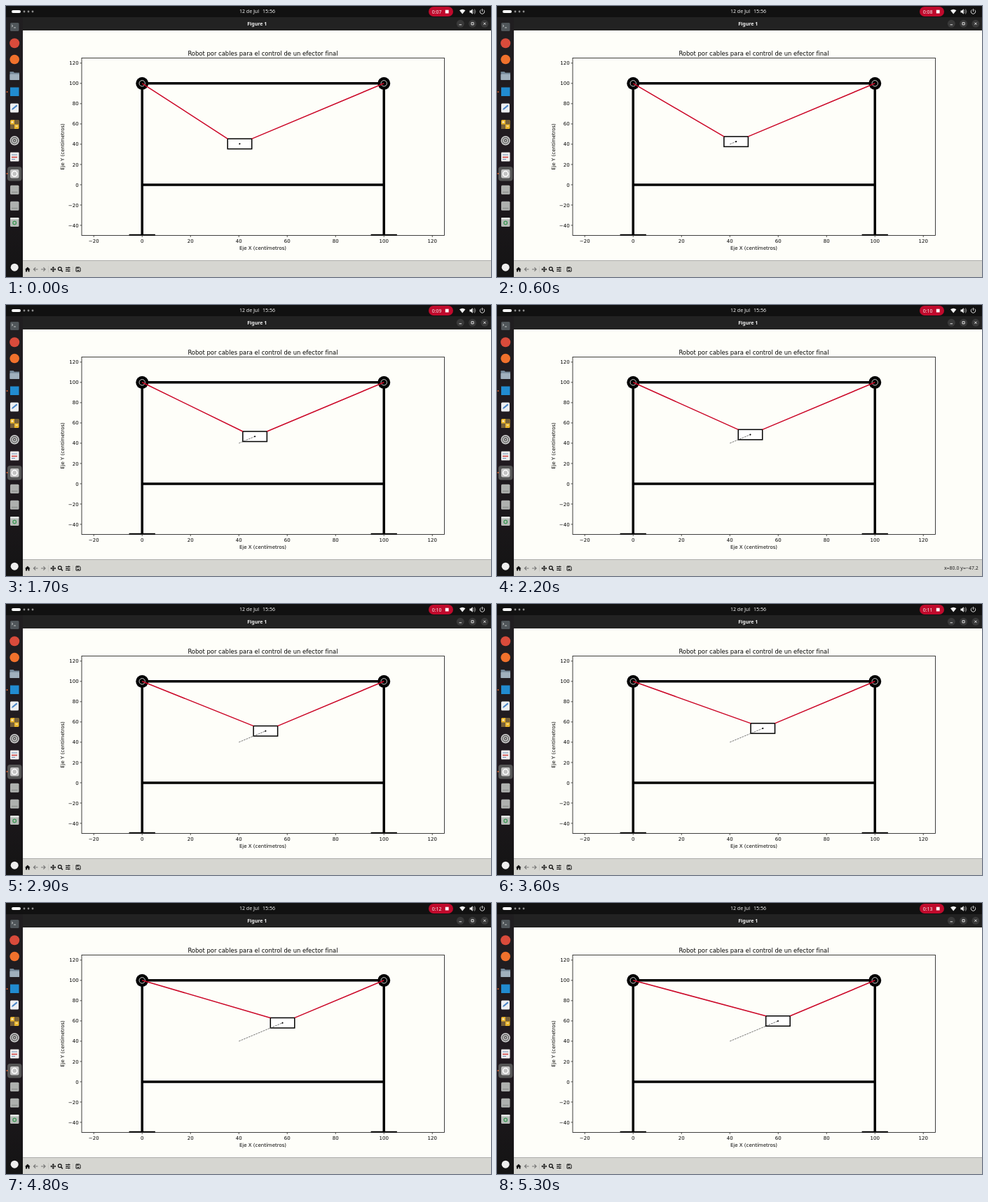
Recreate the animation shown at these times as an HTML page. Size 692 px wide and 388 px high, loop 6000 ms.

```html
<!DOCTYPE html>
<html lang="es">
<head>
<meta charset="utf-8">
<title>Figure 1</title>
<style>
html, body { margin: 0; width: 100%; height: 100%; overflow: hidden; background: #111; }
svg { display: block; width: 692px; height: 388px; }
.ui { font: 7px "Noto Sans", "Open Sans", sans-serif; fill: #f2f2f2; }
.plot { font: 7px "DejaVu Sans", sans-serif; fill: #000; }
.mid { text-anchor: middle; }
.end { text-anchor: end; }
</style>
</head>
<body>
<svg viewBox="0 0 692 388">
  <defs>
    <clipPath id="axes"><rect x="108" y="74.5" width="517.5" height="254"/></clipPath>
    <linearGradient id="dockFill" x2="0" y2="1">
      <stop offset="0" stop-color="#201e20"/><stop offset=".55" stop-color="#211a20"/><stop offset="1" stop-color="#141414"/>
    </linearGradient>
  </defs>

  <!-- top bar -->
  <rect width="692" height="16" fill="#111"/>
  <rect x="8" y="6" width="13" height="4" rx="2" fill="#fff"/>
  <g fill="#8d8d8d"><circle cx="26" cy="8" r="1.4"/><circle cx="32" cy="8" r="1.4"/><circle cx="38" cy="8" r="1.4"/></g>
  <text class="ui" x="333" y="10.4">12 de Jul</text>
  <text class="ui" x="366" y="10.4">15:56</text>
  <rect x="603" y="1" width="35" height="14" rx="7" fill="#c00a2c"/>
  <text class="ui" id="timer" x="607.7" y="10.5"></text>
  <rect x="626.8" y="5.7" width="4.8" height="4.8" fill="#fff"/>
  <g fill="#f2f2f2">
    <path d="M647 6.3Q651.200 3 655.400 6.300L651.200 11.500Z"/>
    <path d="M661.500 6.600h1.800l2.500-2.300v7.400l-2.500-2.300h-1.800Z"/>
    <path d="M667 5.500q2 2.500 0 5M668.500 4.500q2.800 3.500 0 7" fill="none" stroke="#aaa" stroke-width=".8"/>
    <path d="M677.700 5.400a3.200 3.200 0 1 0 3.600 0M679.500 4v4" fill="none" stroke="#f2f2f2" stroke-width=".9"/>
  </g>

  <!-- window -->
  <rect x="24" y="16" width="668" height="19" fill="#222"/>
  <text class="ui mid" x="358.300" y="27.700" font-weight="700" style="font-weight:700">Figure 1</text>
  <g fill="#393939"><circle cx="648.300" cy="25.300" r="5.500"/><circle cx="665.600" cy="25.300" r="5.500"/><circle cx="682.900" cy="25.300" r="5.500"/></g>
  <path d="M646.500 26.800h3.600M664 23.700h3.200v3.200h-3.200ZM681.300 23.700l3.200 3.200m0-3.200l-3.200 3.200" fill="none" stroke="#eee" stroke-width=".9"/>
  <rect x="24" y="35" width="668" height="329.500" fill="#fefef9"/>

  <!-- dock -->
  <rect y="16" width="24" height="372" fill="url(#dockFill)"/>
  <rect x="2" y="230" width="20.500" height="20.500" rx="4" fill="#555"/>
  <g fill="#e2622c"><circle cx="1.600" cy="123" r="1"/><circle cx="1.600" cy="240" r="1"/></g>
  <rect x="6" y="24" width="12.500" height="12" rx="1.500" fill="#50565a"/>
  <path d="M8 27l2 1.500-2 1.500M11 31h3" fill="none" stroke="#ddd" stroke-width=".8"/>
  <circle cx="12.200" cy="53.300" r="7" fill="#d94b3b"/>
  <circle cx="12.200" cy="76.500" r="6.800" fill="#f0712c"/>
  <path d="M5.500 94h5l1.500 1.500h7V106h-13.500Z" fill="#778a9a"/><rect x="5.500" y="97.500" width="13.500" height="8.500" rx="1" fill="#a0b0bd"/>
  <rect x="6" y="116.500" width="12.500" height="12.500" fill="#218bd0"/>
  <rect x="6" y="139.500" width="12" height="13" rx="1.500" fill="#eef0f2"/>
  <path d="M8 149l1-2.500 6-5 1.500 1.500-6 5Z" fill="#4b86c8"/>
  <rect x="6" y="163" width="12.500" height="13" rx="1.500" fill="#e9b52c"/>
  <path d="M12 163h5a1.500 1.500 0 0 1 1.500 1.500V169.500H12ZM6 169.500h6V176H7.500A1.500 1.500 0 0 1 6 174.500Z" fill="#77613a"/>
  <path d="M7.500 166.200h3M9 164.700v3M13.700 172h3" stroke="#fff" stroke-width=".9"/>
  <circle cx="12.200" cy="192.700" r="6.700" fill="#c9c9c9"/>
  <g fill="none" stroke="#555"><circle cx="12.200" cy="192.700" r="4.400" stroke-width="1.200"/><circle cx="12.200" cy="192.700" r="1.700" stroke-width="1.300"/></g>
  <rect x="6" y="209.500" width="12.500" height="13" rx="1" fill="#eee"/>
  <path d="M8 213h8M8 219.500h5" stroke="#6d8fb5"/><path d="M8 216.500h8" stroke="#cf4544" stroke-width="1.600"/>
  <rect x="6" y="234" width="12.500" height="12.500" rx="2" fill="#c3c3c3"/><circle cx="12.200" cy="240.300" r="3.700" fill="none" stroke="#fff" stroke-width="1.500"/>
  <g fill="#aeb0ae"><rect x="6" y="256.700" width="12.500" height="13" rx="1.500"/><rect x="6" y="279.800" width="12.500" height="13" rx="1.500"/></g>
  <path d="M8 266.500h8.500M8 289.600h8.500" stroke="#858785"/>
  <rect x="6" y="303" width="12.500" height="13" rx="1.500" fill="#b7bbb7"/><rect x="6" y="303" width="12.500" height="2.500" rx="1" fill="#e4e6e4"/>
  <circle cx="12.200" cy="310.500" r="2.300" fill="none" stroke="#3d9a56" stroke-width="1.300"/>
  <circle cx="12.200" cy="374.200" r="5.500" fill="#eee"/>

  <!-- toolbar -->
  <rect x="24" y="364.500" width="668" height="23.500" fill="#d6d6d1"/>
  <path d="M27 377.300l3.800-3.500 3.800 3.500h-1.100v3.200h-2v-2.200h-1.500v2.200h-2v-3.200Z" fill="#111"/>
  <path d="M45.500 377h-6m2.600-2.600L39.500 377l2.600 2.600M50 377h6m-2.600-2.600L56 377l-2.600 2.600" fill="none" stroke="#777" stroke-width="1.200"/>
  <path d="M60.500 372.500v9M95.500 372.500v9" stroke="#c3c3be" stroke-width=".8"/>
  <path d="M64.300 377h6M67.300 374v6" stroke="#111" stroke-width="1.200"/>
  <path d="M67.300 373l1.700 1.900h-3.400ZM67.300 381l1.700-1.900h-3.400ZM63.300 377l1.900-1.700v3.400ZM71.300 377l-1.900-1.700v3.400Z" fill="#111"/>
  <circle cx="76.800" cy="376.200" r="2.400" fill="none" stroke="#111" stroke-width="1.200"/><path d="M78.500 378l2.300 2.400" stroke="#111" stroke-width="1.500"/>
  <path d="M85 374.500h6.600M85 377h6.600M85 379.500h6.600M89.600 373.500v2M87 376v2M89.600 378.500v2" stroke="#111"/>
  <path d="M100 374h4.800l1.200 1.200v4.800h-6Z" fill="none" stroke="#111"/><path d="M101 375.200h3M101.800 378.500h2.200" stroke="#111" stroke-width="1.300"/>
  <text class="ui end" id="coords" x="686.800" y="379.300" style="fill:#222">x=80.0 y=−47.2</text>

  <!-- chart -->
  <g class="plot">
    <text class="mid" x="366.500" y="70.500" style="font-size:8.410px">Robot por cables para el control de un efector final</text>
    <text class="mid" x="366.500" y="348.800">Eje X (centímetros)</text>
    <text class="mid" transform="translate(83.300 201.500) rotate(-90)">Eje Y (centímetros)</text>
    <g id="ticks" stroke-width=".7"></g>
  </g>
  <g clip-path="url(#axes)" fill="none">
    <path id="frame" stroke="#000" stroke-width="3.500"/>
    <g id="pulleys"></g>
    <rect id="box" width="34.500" height="14.500" fill="#fff" stroke="#000" stroke-width="1.500"/>
    <path id="trail" stroke="#444" stroke-width=".75" stroke-dasharray="2.600 1.150"/>
    <path id="cables" stroke="#cb0626" stroke-width="1.500"/>
    <circle id="dot" r="1.050" fill="#000"/>
  </g>
  <rect x="108" y="74.500" width="517.500" height="254" fill="none" stroke="#111" stroke-width=".8"/>
</svg>
<script>
const $ = id => document.getElementById(id);
const px = x => 194.25 + 3.45 * x;
const py = y => 255.93 - 1.4514 * y;
const pt = (x, y) => `${px(x)} ${py(y)}`;
const line = (...p) => 'M' + p.map(([x, y]) => pt(x, y)).join('L');
const set = (id, attrs) => {
  for (const key in attrs) $(id).setAttribute(key, attrs[key]);
};
const label = v => String(v).replace('-', '−');

let ticks = '';
for (let x = -20; x <= 120; x += 20)
  ticks += `<path d="M${px(x)} 328.5v2.500" stroke="#111"/><text class="mid" x="${px(x)}" y="339.200">${label(x)}</text>`;
for (let y = -40; y <= 120; y += 20)
  ticks += `<path d="M108 ${py(y)}h-2.500" stroke="#111"/><text class="end" x="103.600" y="${py(y) + 2.6}">${label(y)}</text>`;
$('ticks').innerHTML = ticks;

set('frame', { d: line([0, -50], [0, 100], [100, 100], [100, -50]) + line([0, 0], [100, 0]) +
  line([-5.4, -50], [5.4, -50]) + line([94.6, -50], [105.4, -50]) });
$('pulleys').innerHTML = [0, 100].map(x =>
  `<g transform="translate(${pt(x, 100)})"><circle r="9" fill="#000"/><circle r="4.200" stroke="#e8e8e8" stroke-width=".9"/></g>`).join('');

function draw(now) {
  const t = Math.floor(now % 6000 / 100) / 10;
  const p = 40.35 + 19.55 * Math.min(t / 5.3, 1);
  set('box', { x: px(p - 5), y: py(p + 5) });
  set('dot', { cx: px(p), cy: py(p) });
  set('trail', { d: line([40, 40], [p, p]) });
  set('cables', { d: line([0, 100], [p - 5, p + 5]) + line([100, 100], [p + 5, p + 5]) });
  $('timer').textContent = '0:' + String(Math.floor(7.85 + t)).padStart(2, '0');
  $('coords').style.display = t >= 2 && t < 2.9 ? '' : 'none';
}

let start;
function tick(now) {
  start ??= now;
  draw(now - start);
  requestAnimationFrame(tick);
}
draw(0);
requestAnimationFrame(tick);
</script>
</body>
</html>
```
